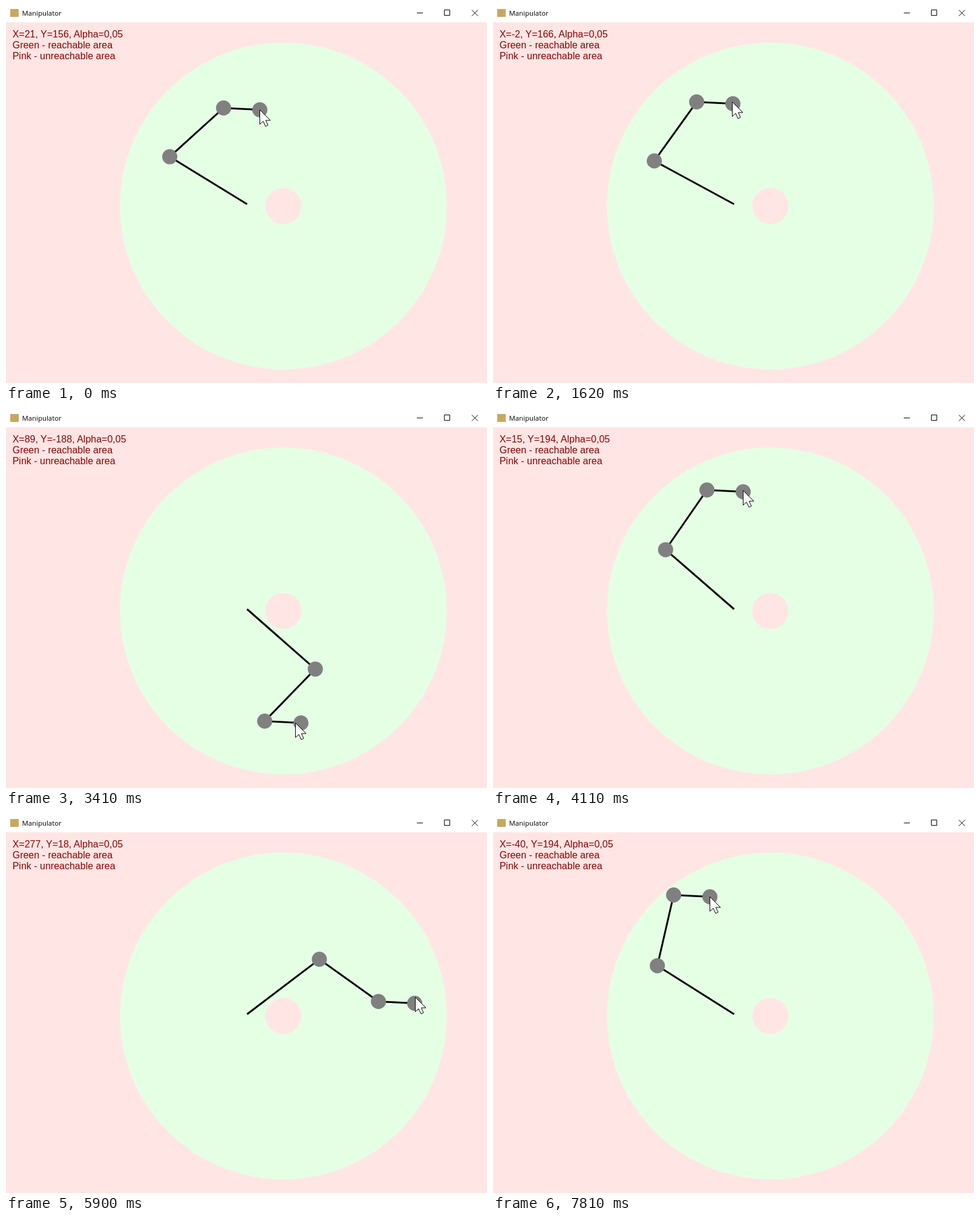
Recreate the animation shown at these times as an HTML page. Size 795 by 623 pixels, loop 7990 ms.

```html
<!DOCTYPE html>
<html lang="en">
<head>
<meta charset="utf-8">
<title>Manipulator</title>
<style>
  html, body { margin: 0; width: 100%; height: 100%; overflow: hidden; background: #ffe6e4; }
  svg { display: block; width: 795px; height: 623px; }
  .title { font: 11.4px "Open Sans", "Noto Sans", sans-serif; fill: #000; }
  .info { font: 16px "Liberation Sans", Arial, sans-serif; fill: #8b0000; }
</style>
</head>
<body>
<svg viewBox="0 0 795 623">
  <rect width="795" height="623" fill="#ffe6e4"/>
  <rect width="795" height="27" fill="#fff"/>
  <rect x="7" y="5" width="14" height="13" fill="#c8a860"/>
  <text class="title" x="26.5" y="16">Manipulator</text>
  <path d="M679 11.5H689M724.5 6.5h9v9h-9zM770 6.5l10 10M780 6.5l-10 10" fill="none" stroke="#000"/>

  <circle cx="458.5" cy="330.5" r="270" fill="#e5ffe5"/>
  <circle cx="458.5" cy="330.5" r="30" fill="#ffe6e4"/>

  <g class="info">
    <text id="pose" x="10.7" y="52"></text>
    <text x="10.7" y="70">Green - reachable area</text>
    <text x="10.7" y="88">Pink - unreachable area</text>
  </g>

  <polyline id="arm" fill="none" stroke="#000" stroke-width="3"/>
  <g fill="#808080">
    <circle class="joint" r="12.5"/>
    <circle class="joint" r="12.5"/>
    <circle class="joint" r="12.5"/>
  </g>
  <path id="cursor" d="M0 0V24L5.5 19L9.5 27.5L13.5 25.5L9.8 17.5H17.5Z" fill="#fff" stroke="#000"/>
</svg>
<script>
const LOOP = 7990;
const BASE = { x: 398.5, y: 327.5 };
const UPPER = 150, FOREARM = 120, PALM = 60, ALPHA = 0.05;
const POINTER_LEAD = 12;

// Redraw schedule: start of a stretch, number of equal steps in it.
const STEPS = [
  [0, 1], [390, 1], [720, 10], [1550, 2], [1690, 9], [2370, 6], [2780, 20],
  [4180, 9], [4780, 25], [6530, 7], [6980, 1], [7070, 11], [7810, 1]
];

// Pointer path: time, x, y (relative to the base, y up).
const PATH = [
  [0, 21, 156], [390, 20, 156], [720, 22, 158], [900, 28, 150],
  [1250, -6, 118], [1550, 0, 150], [1620, -2, 166], [1690, -8, 178],
  [2000, -92, 108], [2300, -45, 195], [2640, 85, 183], [2780, 129, 159],
  [2920, 188, 95], [3130, 210, -57], [3380, 110, -185], [3600, -70, -130],
  [3800, -120, 60], [4000, -5, 170], [4110, 15, 194], [4250, -10, 210],
  [4550, -130, 120], [4780, -165, -15], [5080, -85, -185], [5400, 90, -243],
  [5620, 190, -205], [5830, 267, -45], [5900, 277, 18], [5970, 275, 72],
  [6250, 140, 225], [6460, -40, 190], [6700, -30, 120], [6900, -14, 136],
  [6980, -18, 178], [7070, -25, 203], [7390, -60, 180], [7810, -40, 194],
  [LOOP, -40, 194]
];

const poseText = document.getElementById("pose");
const arm = document.getElementById("arm");
const joints = document.querySelectorAll(".joint");
const cursor = document.getElementById("cursor");

function snap(t) {
  let i = STEPS.length - 1;
  while (t < STEPS[i][0]) i--;
  const [start, count] = STEPS[i];
  const end = i + 1 < STEPS.length ? STEPS[i + 1][0] : LOOP;
  const size = (end - start) / count;
  return start + Math.floor((t - start) / size + 1e-6) * size;
}

function slope(i, axis) {
  if (i === 0 || i >= PATH.length - 2) return 0;
  const a = PATH[i - 1], b = PATH[i + 1];
  return (b[axis] - a[axis]) / (b[0] - a[0]);
}

// Cubic Hermite through the path points.
function pointAt(t) {
  let i = 0;
  while (i < PATH.length - 2 && t >= PATH[i + 1][0]) i++;
  const a = PATH[i], b = PATH[i + 1];
  const d = b[0] - a[0], u = Math.min(1, (t - a[0]) / d), v = 1 - u;
  const [x, y] = [1, 2].map(k =>
    v * v * (1 + 2 * u) * a[k] + u * u * (3 - 2 * u) * b[k] +
    d * u * v * (v * slope(i, k) - u * slope(i + 1, k)));
  return { x: Math.round(x), y: Math.round(y) };
}

function solveArm(hand) {
  const wrist = { x: hand.x - PALM * Math.cos(ALPHA), y: hand.y + PALM * Math.sin(ALPHA) };
  const dist = Math.hypot(wrist.x, wrist.y);
  const cos = (UPPER ** 2 + dist ** 2 - FOREARM ** 2) / (2 * UPPER * dist);
  const shoulder = Math.atan2(wrist.y, wrist.x) + Math.acos(Math.max(-1, Math.min(1, cos)));
  const elbow = { x: UPPER * Math.cos(shoulder), y: UPPER * Math.sin(shoulder) };
  return [elbow, wrist, hand];
}

const toScreen = p => [BASE.x + p.x, BASE.y - p.y];

function draw(time) {
  const t = snap(time % LOOP);
  const hand = pointAt(t);
  const points = solveArm(hand).map(toScreen);
  arm.setAttribute("points", [[BASE.x, BASE.y], ...points].join(" "));
  points.forEach(([x, y], i) => {
    joints[i].setAttribute("cx", x);
    joints[i].setAttribute("cy", y);
  });
  const [cx, cy] = toScreen(pointAt(t + POINTER_LEAD));
  cursor.setAttribute("transform", `translate(${cx} ${cy})`);
  poseText.textContent = `X=${hand.x}, Y=${hand.y}, Alpha=0,05`;
}

const begin = performance.now();
function tick() {
  draw(Math.max(0, performance.now() - begin));
  requestAnimationFrame(tick);
}
tick();
</script>
</body>
</html>
```
